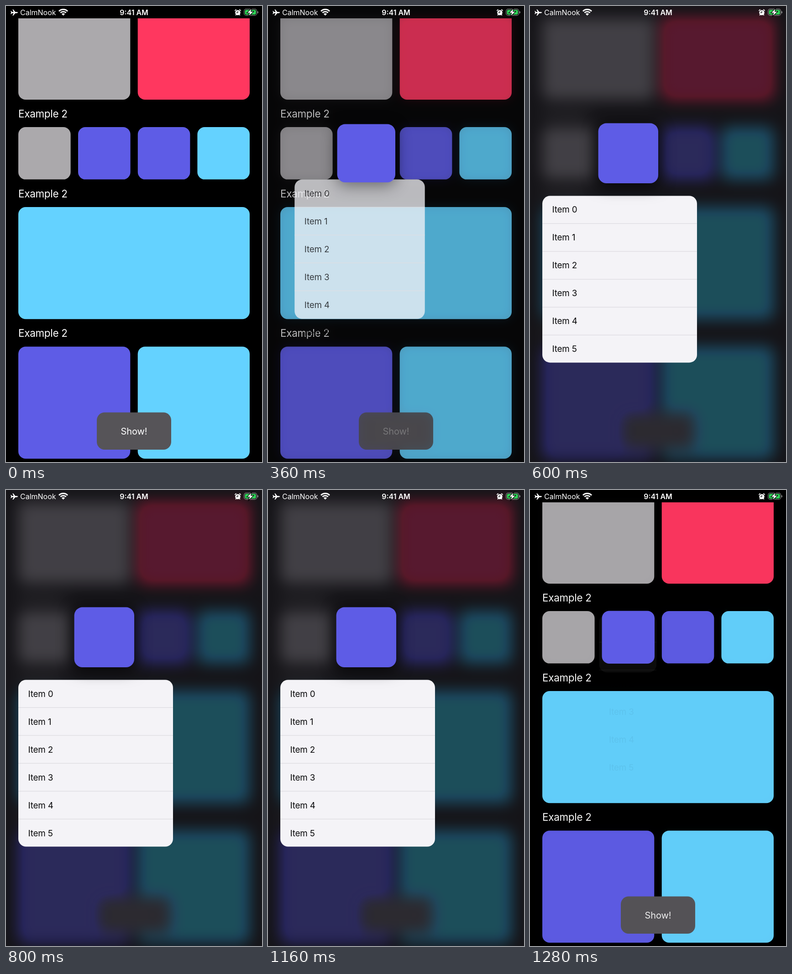
An HTML page with a canvas that plays this animation: 561 by 998 pixels, repeating every 1.32 s.

```html
<!DOCTYPE html>
<html lang="en">
<head>
<meta charset="utf-8">
<title>Context menu</title>
<style>
  html, body { margin: 0; width: 100%; height: 100%; overflow: hidden; background: #000; }
  canvas { display: block; }
</style>
</head>
<body>
<canvas id="stage" width="561" height="998"></canvas>
<script>
const W = 561, H = 998, LOOP = 1320, STEP = 40;
const OPEN_AT = 296, CLOSE_AT = 1186;
const GRAY = '#aba9ac', RED = '#ff375f', INDIGO = '#5e5ce6', CYAN = '#64d2ff';
const STATUS_H = 27, ROW = 61;
const TILE = { x: 158, y: 265, w: 114.6, h: 114.6 };
const MENU = { x: 27, y: 415.5, w: 339, h: 365 };

const ctx = document.getElementById('stage').getContext('2d');
const scene = makeLayer(), veil = makeLayer();

function makeLayer() {
  const canvas = document.createElement('canvas');
  canvas.width = W;
  canvas.height = H;
  return canvas.getContext('2d');
}

const clamp01 = v => Math.min(1, Math.max(0, v));
const lerp = (a, b, k) => a + (b - a) * k;
const smooth = v => { const k = clamp01(v); return k * k * (3 - 2 * k); };

// Underdamped step response with a slight overshoot.
function spring(ms) {
  if (ms <= 0) return 0;
  const x = ms * 0.02175, decay = 1.3;
  return 1 - Math.exp(-decay * x) * (Math.cos(x) + decay * Math.sin(x));
}

function box(c, x, y, w, h, r, color) {
  c.fillStyle = color;
  c.beginPath();
  c.roundRect(x, y, w, h, r);
  c.fill();
}

function label(c, text, x, y, size, color, { weight = 400, align = 'left', spacing = 0 } = {}) {
  c.font = `${weight} ${size}px Inter, "Liberation Sans", sans-serif`;
  c.letterSpacing = spacing + 'px';
  c.textAlign = align;
  c.fillStyle = color;
  c.fillText(text, x, y);
}

function drawScene(dim) {
  const c = scene;
  c.fillStyle = '#000';
  c.fillRect(0, 0, W, H);
  c.save();
  c.beginPath();
  c.rect(0, STATUS_H, W, H);
  c.clip();
  const big = (x, y, color, w = 245.3) => box(c, x, y, w, 245.3, 16, color);
  big(27, -40.3, GRAY);
  big(288.7, -40.3, RED);
  [[27, GRAY], [288.8, INDIGO], [419.4, CYAN]].forEach(([x, color]) =>
    box(c, x, TILE.y, TILE.w, TILE.h, 16, color));
  big(27, 440, CYAN, 507);
  big(27, 745.5, INDIGO);
  big(288.7, 745.5, CYAN);
  for (const y of [243.5, 418.5, 724]) label(c, 'Example 2', 27, y, 22.4, '#fff', { spacing: -0.25 });

  box(c, 199, 889.5, 163, 81.5, 17, '#565458');
  const tone = lerp(255, 120, clamp01(dim * 2.5));
  label(c, 'Show!', 280.5, 937.5, 20, `rgb(${tone},${tone},${tone})`, { align: 'center', spacing: -0.1 });
  c.restore();
}

function drawVeil(amount) {
  const c = veil;
  c.fillStyle = '#000';
  c.fillRect(0, 0, W, H);
  c.filter = `blur(${10 + 6 * amount}px) saturate(1.8)`;
  c.drawImage(scene.canvas, 0, 0);
  c.filter = 'none';
  c.fillStyle = 'rgba(29,27,33,.742)';
  c.fillRect(0, 0, W, H);
}

function drawMenu(q) {
  const [x, y, w, h] = ['x', 'y', 'w', 'h'].map(k => lerp(TILE[k], MENU[k], q));
  ctx.save();
  ctx.globalAlpha = clamp01(q);
  box(ctx, x, y, w, h, 17, '#f4f3f7');
  ctx.fillStyle = '#dfdee3';
  for (let i = 1; i < 6; i++) {
    const lineY = y + i * ROW - 1;
    if (lineY < y + h - 2) ctx.fillRect(x, lineY, w, 1.4);
  }
  for (let i = 0; i < 6; i++) {
    label(ctx, 'Item ' + i, x + 21.5, y + i * ROW + 37, 18.8, '#08080a', { spacing: -0.15 });
  }
  ctx.restore();
}

function drawTile(q) {
  const grow = 8.4 * q, size = TILE.w + 2 * grow;
  ctx.save();
  ctx.shadowColor = `rgba(0,0,0,${0.6 * clamp01(q)})`;
  ctx.shadowBlur = 34;
  ctx.shadowOffsetY = 6;
  box(ctx, TILE.x - grow, TILE.y - grow, size, size, 16 + 2 * q, INDIGO);
  ctx.restore();
}

const plane = new Path2D('M26 14.3C26 13.2 24.5 12.9 23 12.9H20.3L16 7.5H14.3L16.6 12.9H13.2L11.4 10.8H10.2' +
  'L11.3 14.3 10.2 17.8H11.4L13.2 15.7H16.6L14.3 21.1H16L20.3 15.7H23C24.5 15.7 26 15.4 26 14.3Z');
const bolt = new Path2D('M537.5 6.5L529 14.8H534.3L532.6 21 541.5 12.4H536Z');

function strokeArc(x, y, r, from, to, width) {
  ctx.lineWidth = width;
  ctx.beginPath();
  ctx.arc(x, y, r, from * Math.PI, to * Math.PI);
  ctx.stroke();
}

function drawStatusBar() {
  ctx.save();
  ctx.fillStyle = ctx.strokeStyle = '#fff';
  ctx.fill(plane);

  // Wi-Fi
  strokeArc(125.5, 21, 13.4, -0.75, -0.25, 3);
  strokeArc(125.5, 21, 8.7, -0.75, -0.25, 2.8);
  ctx.beginPath();
  ctx.moveTo(125.5, 21);
  ctx.arc(125.5, 21, 5.3, -0.75 * Math.PI, -0.25 * Math.PI);
  ctx.fill();

  // Alarm
  ctx.beginPath();
  ctx.arc(508, 14.5, 5.7, 0, 2 * Math.PI);
  ctx.fill();
  strokeArc(508, 14.5, 7.6, -0.83, -0.64, 1.7);
  strokeArc(508, 14.5, 7.6, -0.36, -0.17, 1.7);
  ctx.beginPath();
  ctx.moveTo(505, 18); ctx.lineTo(503.2, 20.4);
  ctx.moveTo(511, 18); ctx.lineTo(512.8, 20.4);
  ctx.stroke();
  ctx.strokeStyle = '#111';
  ctx.lineWidth = 1.2;
  ctx.beginPath();
  ctx.moveTo(508, 10.8); ctx.lineTo(508, 14.7); ctx.lineTo(504.8, 14.7);
  ctx.stroke();

  // Battery
  ctx.strokeStyle = 'rgba(255,255,255,.5)';
  ctx.beginPath();
  ctx.roundRect(521.7, 6.7, 28, 14, 4.5);
  ctx.stroke();
  box(ctx, 551, 11.2, 2, 5, [0, 2, 2, 0], 'rgba(255,255,255,.5)');
  box(ctx, 523.6, 8.6, 24.2, 10.2, 2.8, '#30d158');
  ctx.strokeStyle = '#000';
  ctx.lineWidth = 2.4;
  ctx.stroke(bolt);
  ctx.fillStyle = '#fff';
  ctx.fill(bolt);

  label(ctx, 'CalmNook', 31, 20, 16, '#fff');
  label(ctx, '9:41 AM', 280.5, 20, 16, '#fff', { weight: 600, align: 'center' });
  ctx.restore();
}

function render(t) {
  const closing = t > CLOSE_AT;
  const q = closing ? 1 - spring(t - CLOSE_AT) : spring(t - OPEN_AT);
  const dim = closing ? 1 - smooth((t - CLOSE_AT) / 105) : smooth((t - OPEN_AT) / 175);

  drawScene(dim);
  ctx.drawImage(scene.canvas, 0, 0);
  if (dim > 0) {
    drawVeil(dim);
    ctx.globalAlpha = dim;
    ctx.drawImage(veil.canvas, 0, 0);
    ctx.globalAlpha = 1;
  }
  if (q > 0) drawMenu(q);
  drawTile(q);
  drawStatusBar();
}

const start = performance.now();
let shown = -1;
function tick() {
  const elapsed = (performance.now() - start) % LOOP;
  const t = Math.floor(elapsed / STEP) * STEP;
  if (t !== shown) render(shown = t);
  requestAnimationFrame(tick);
}
tick();
</script>
</body>
</html>
```
